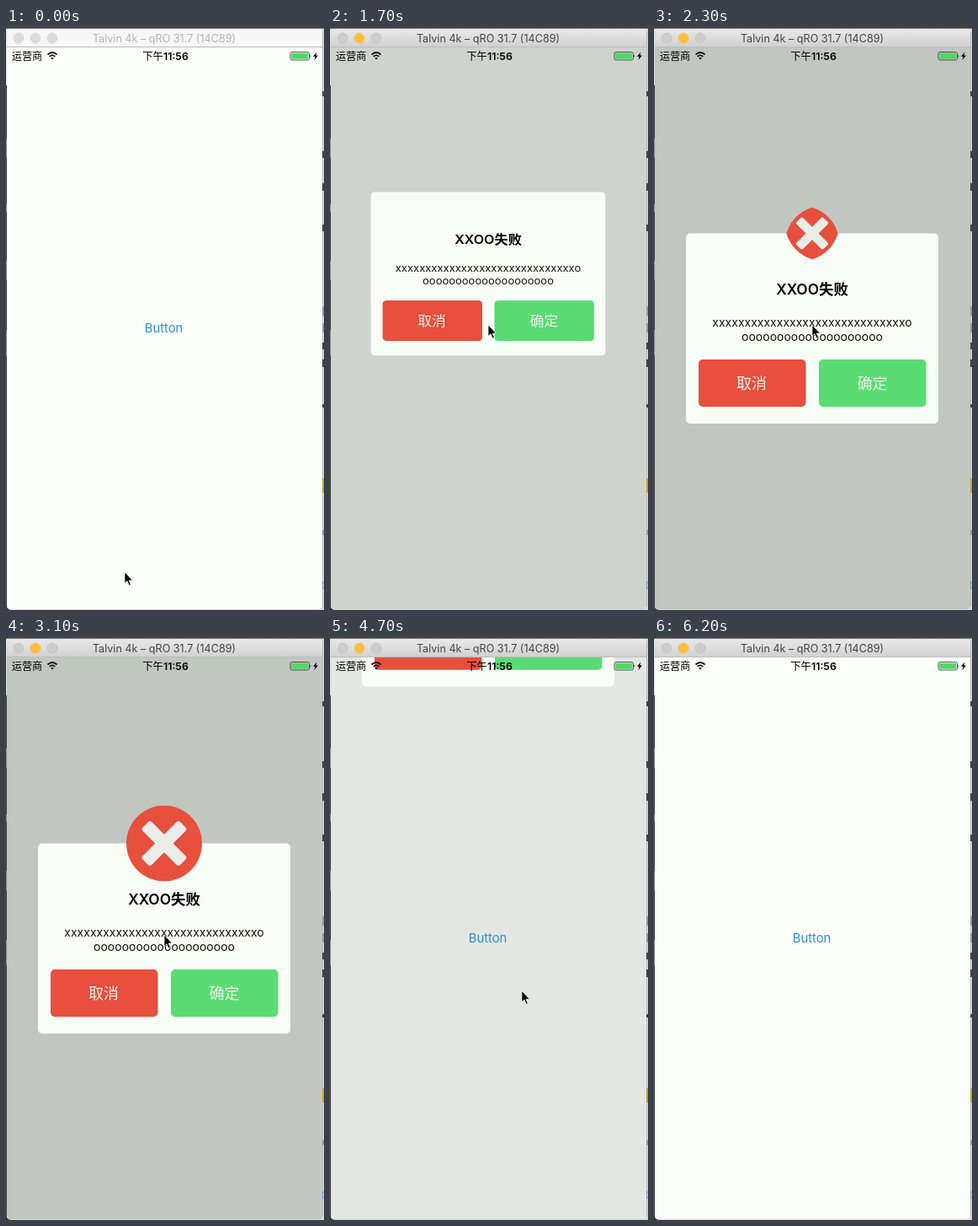
An HTML page that plays this animation: 378x690 px, repeating every 6300 ms.

```html
<!DOCTYPE html>
<html lang="zh">
<head>
<meta charset="utf-8">
<style>
  html, body { margin: 0; width: 378px; height: 690px; overflow: hidden; background: #d9dad9; }
  svg { display: block; }
  text { font-family: Inter, "Noto Sans CJK SC", "Noto Sans CJK", sans-serif; text-anchor: middle; }
</style>
</head>
<body>
<svg width="378" height="690" viewBox="0 0 378 690">
  <defs>
    <linearGradient id="bar" x2="0" y2="1">
      <stop stop-color="#e9e9e9"/><stop offset="1" stop-color="#d0d0d0"/>
    </linearGradient>
    <clipPath id="view"><path d="M1 23H376V684q0 5-5 5H6q-5 0-5-5Z"/></clipPath>
    <clipPath id="badgeClip"><path id="badgeShape"/></clipPath>
  </defs>

  <!-- desktop showing around the window -->
  <path d="M0 .5H378" stroke="#777"/>
  <path d="M.5 68V690" stroke="#8a8a8a"/>
  <path d="M.5 68V131M.5 154V209M.5 218V276M.5 299V358M.5 388V690" stroke="#444"/>
  <path d="M0 684v6h7q-6 0-7-6" fill="#333"/>
  <path d="M376.500 4V686" stroke="#b9bab9"/>
  <g stroke-width="2">
    <path d="M377 75v6M377 146v8M377 184v9M377 233v8M377 373v8M377 393v9M377 446v4" stroke="#444"/>
    <path d="M377 330v11M377 350v11M377 595v6" stroke="#999"/>
    <path d="M377 534v17" stroke="#c4a52c"/>
  </g>
  <path d="M378 656q-4 4.500 0 9" fill="none" stroke="#3a8fe0"/>

  <g clip-path="url(#view)">
    <rect id="screen" x="1" y="23" width="375" height="667"/>
    <text x="187.500" y="361" font-size="14.800" fill="#2b8fe0">Button</text>
    <g id="dialog">
      <rect x="38" y="243.500" width="300" height="225.500" rx="5" fill="#f9fdf7"/>
      <text x="188" y="315.500" font-size="17.400" font-weight="600">XXOO失败</text>
      <g font-size="14" fill="#111">
        <text id="line1" x="188" y="354"></text>
        <text id="line2" x="188" y="371"></text>
      </g>
      <rect x="53" y="393" width="127.500" height="56" rx="5" fill="#e84f3d"/>
      <rect x="196" y="393" width="127.500" height="56" rx="5" fill="#59dc74"/>
      <g font-size="18" fill="#f5f4ee">
        <text x="116" y="428">取消</text>
        <text x="259.500" y="428">确定</text>
      </g>
      <g id="badge" transform="translate(188 243.500)">
        <g clip-path="url(#badgeClip)">
          <rect x="-46" y="-46" width="92" height="92" fill="#e84f3d"/>
          <g id="cross" fill="#ebeee8">
            <rect x="-31.500" y="-7.500" width="63" height="15" rx="3" transform="rotate(45)"/>
            <rect x="-31.500" y="-7.500" width="63" height="15" rx="3" transform="rotate(-45)"/>
          </g>
        </g>
      </g>
    </g>
  </g>

  <!-- status bar -->
  <text x="25" y="37.500" font-size="12.200">运营商</text>
  <path d="M49.500 31.500q5.500-5 11 0M51.700 33.900q3.300-3 6.600 0" fill="none" stroke="#111" stroke-width="1.700"/>
  <path d="M53.200 35.600q1.800-1.400 3.600 0L55 37.500Z"/>
  <text x="189.500" y="37.500" font-size="12.400" font-weight="600"><tspan font-weight="400">下午</tspan>11:56</text>
  <rect x="338" y="28.500" width="22.500" height="9.500" rx="2" fill="none" stroke="#333" stroke-width=".8"/>
  <rect x="339.200" y="29.700" width="20.100" height="7.100" rx="1" fill="#4fd964"/>
  <path d="M361.500 31.500q1.800 1.700 0 3.500Z"/>
  <path d="M369.500 28.500L365 33.800h2.600l-1.200 4.200 4.600-5.600h-2.700Z"/>

  <!-- title bar -->
  <path id="titleBar" d="M1 23V5q0-4 4-4H372q4 0 4 4V23Z"/>
  <path d="M1 22.500H376" stroke="#bdbdbd"/>
  <g id="lights">
    <circle cx="15" cy="12" r="6"/><circle cx="35" cy="12" r="6"/><circle cx="55" cy="12" r="6"/>
  </g>
  <text id="title" x="188" y="17" font-size="12.600">Talvin 4k – qRO 31.7 (14C89)</text>

  <path id="cursor" d="M0 0V13.500L3 10.700 5.200 16 7.400 15 5.200 10H9.500Z" stroke="#fff" stroke-width=".8"/>
</svg>
<script>
const LOOP = 6300, RADIUS = 45;
const $ = id => document.getElementById(id);
const set = (el, attrs) => { for (const k in attrs) el.setAttribute(k, attrs[k]); };
const mix = (a, b, p) => a + (b - a) * p;
const span = (t, start, length) => Math.min(1, Math.max(0, (t - start) / length));
const ease = p => p * p * (3 - 2 * p);

// time, x, y of the pointer tip
const path = [
  [0, 141, 645], [150, 144, 635], [400, 178, 510], [700, 198, 394], [800, 189, 370],
  [1100, 188, 352], [3350, 188, 352], [3900, 238, 415], [4300, 236, 419], [4700, 228, 418],
  [5000, 200, 470], [5400, 152, 576], [5600, 142, 625], [5800, 126, 691]
];

function pointer(t) {
  const i = path.findIndex(p => p[0] > t);
  if (i < 0) return [0, 720];
  const [t0, x0, y0] = path[i - 1], [t1, x1, y1] = path[i];
  const p = (t - t0) / (t1 - t0);
  return [mix(x0, x1, p), mix(y0, y1, p)];
}

// Square whose fixed corner radius may exceed half its side, giving pointed edges
function badgeOutline(size) {
  const d = RADIUS - size / 2;
  const h = Math.sqrt(RADIUS * RADIUS - d * d) - d;
  const arc = (x, y) => `A${RADIUS} ${RADIUS} 0 0 1 ${x} ${y}`;
  return `M0 ${-h}` + arc(h, 0) + arc(0, h) + arc(-h, 0) + arc(0, -h) + 'Z';
}

function draw(t) {
  const active = t >= 300;
  const grey = active ? '#cdcdcd' : '#dcdcdc';
  set($('titleBar'), { fill: active ? 'url(#bar)' : '#f6f6f6' });
  set($('title'), { fill: active ? '#454545' : '#b4b4b4' });
  set($('lights'), { fill: grey, stroke: active ? '#bcbcbc' : '#d4d4d4', 'stroke-width': .7 });
  const amber = active ? '#fdbf3c' : grey;
  set($('lights').children[1], { fill: amber, stroke: amber });

  const enter = span(t, 1243, 600), leave = span(t, 4354, 600);
  const shade = enter * (1 - leave);
  const tone = [[252, 193], [254, 198], [251, 192]].map(([a, b]) => Math.round(mix(a, b, shade)));
  set($('screen'), { fill: `rgb(${tone})` });

  const p = ease(enter);
  const y = mix(-102, 356, p) - 667 * ease(leave);
  set($('dialog'), {
    visibility: p > 0 && leave < 1 ? 'visible' : 'hidden',
    transform: `translate(188 ${y}) scale(${mix(.5, 1, p)} ${p}) translate(-188 -356)`
  });

  const grow = ease(span(t, 1910, 600));
  set($('badge'), { display: grow > 0 ? 'inline' : 'none' });
  set($('badgeShape'), { d: badgeOutline(2 * RADIUS * grow) });
  set($('cross'), { transform: `scale(${grow})` });

  set($('cursor'), { transform: `translate(${pointer(t)})` });
}

$('line1').textContent = 'x'.repeat(30) + 'o';
$('line2').textContent = 'o'.repeat(20);

const begin = performance.now();
function tick() {
  draw((performance.now() - begin) % LOOP);
  requestAnimationFrame(tick);
}
tick();
</script>
</body>
</html>
```
